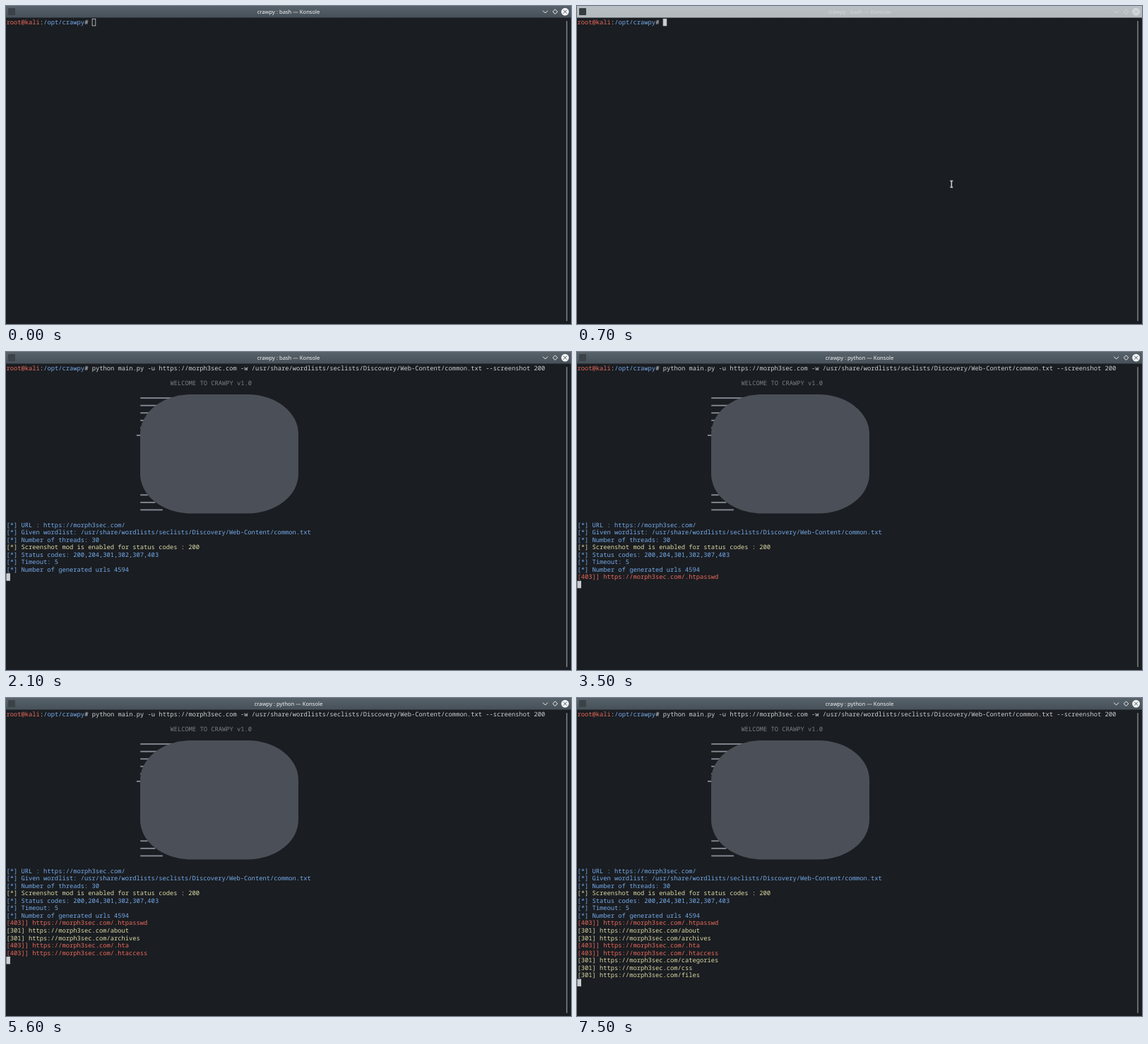
An HTML page that plays this animation: 800x450 px, repeating every 8 s.

```html
<!DOCTYPE html>
<html lang="en">
<head>
<meta charset="utf-8">
<title>Terminal</title>
<style>
html, body { margin: 0; width: 100%; height: 100%; overflow: hidden; background: #1a1d21; }
svg { display: block; width: 100vw; height: 100vh; }
text { white-space: pre; text-rendering: geometricPrecision; }
.mono { font: 8.783px "Noto Sans Mono", monospace; }
.title { font: 7.62px "Noto Sans", sans-serif; text-anchor: middle; }
</style>
</head>
<body>
<svg id="stage" viewBox="0 0 800 450">
  <defs>
    <linearGradient id="bar" x2="0" y2="1">
      <stop stop-color="#58626a"/><stop offset="1" stop-color="#465058"/>
    </linearGradient>
  </defs>
  <rect width="800" height="450" fill="#1a1d21"/>
  <rect width="800" height="16.5" fill="url(#bar)"/>
  <rect id="light" width="800" height="16.5" fill="#eceef0"/>
  <rect id="icon" x="3" y="3" width="10" height="10" rx=".8"/>
  <text id="title" class="title" x="400" y="10.9"></text>
  <g id="buttons" fill="none" stroke-width="1">
    <path d="M760.2 6.6l3.4 3.4 3.4-3.4M777.5 4.8l3.3 3.3-3.3 3.3-3.3-3.3z"/>
    <circle id="close" cx="791.6" cy="8.1" r="5.4" stroke="none"/>
    <path id="cross" d="M789.1 5.6l5 5m0-5l-5 5"/>
  </g>
  <rect x="793.2" y="21" width="1.7" height="425" rx=".8" fill="#74787b"/>
  <g id="screen" class="mono"></g>
  <rect id="cursor" width="4.7" height="9.6" stroke="#cccfd1" stroke-width=".8"/>
  <path id="pointer" d="M528.3 247.5h4M530.3 247.5v9M528.3 256.5h4" fill="none" stroke="#c9ccce" stroke-width="1.6"/>
</svg>
<script>
const LOOP = 8000, COL = 5.27, ROW = 10.55, LEFT = 0.5, BASE = 26;
const RED = '#ea6a5c', BLUE = '#76abec', YELLOW = '#dcdaa6', WHITE = '#cfd2d4', GREY = '#7c8087';
const SITE = 'https://morph3sec.com';
const $ = id => document.getElementById(id);
const screen = $('screen');
const timed = [];

function add(tag, attrs, parent = screen) {
  const el = document.createElementNS('http://www.w3.org/2000/svg', tag);
  for (const key in attrs) el.setAttribute(key, attrs[key]);
  return parent.appendChild(el);
}

function print(at, row, col, fill, str) {
  const el = add('text', { x: LEFT + col * COL, y: BASE + row * ROW, fill });
  el.textContent = str;
  timed.push({ at, el });
}

print(0, 0, 0, RED, 'root@kali');
print(0, 0, 9, WHITE, ':');
print(0, 0, 10, BLUE, '/opt/crawpy');
print(0, 0, 21, WHITE, '#');
print(1500, 0, 23, WHITE, `python main.py -u ${SITE} -w /usr/share/wordlists/seclists/Discovery/Web-Content/common.txt --screenshot 200`);
print(2100, 2, 44, GREY, 'WELCOME TO CRAWPY v1.0');

// Banner: ruled lines behind one plain rounded shape
const banner = add('g', {});
timed.push({ at: 2100, el: banner });
const rule = (row, col, n) => add('rect', {
  x: LEFT + col * COL, y: 22 + row * ROW, width: n * COL, height: 1.9, fill: '#858993'
}, banner);
[12, 8, 6, 4, 4, 0, 0, 0, 0, 2, 0, 0, 0, 2, 4, 6].forEach((n, i) => n && rule(4 + i, 36, n));
rule(9, 35, 2);
rule(4, 65, 3);
add('rect', { x: 190, y: 60, width: 224, height: 168.5, rx: 72, ry: 56, fill: '#4b4f57' }, banner);

[
  [BLUE, `URL : ${SITE}/`],
  [BLUE, 'Given wordlist: /usr/share/wordlists/seclists/Discovery/Web-Content/common.txt'],
  [BLUE, 'Number of threads: 30'],
  [YELLOW, 'Screenshot mod is enabled for status codes : 200'],
  [BLUE, 'Status codes: 200,204,301,302,307,403'],
  [BLUE, 'Timeout: 5'],
  [BLUE, 'Number of generated urls 4594']
].forEach(([fill, str], i) => print(2100, 21 + i, 0, fill, '[*] ' + str));

const hits = [
  [3500, 403, '.htpasswd'], [3900, 301, 'about'], [4700, 301, 'archives'],
  [5600, 403, '.hta'], [5600, 403, '.htaccess'], [5700, 301, 'categories'],
  [6300, 301, 'css'], [7200, 301, 'files']
];
hits.forEach(([at, code, path], i) => {
  const denied = code === 403;
  print(at, 28 + i, 0, denied ? RED : YELLOW, `[${code}]${denied ? ']' : ''} ${SITE}/${path}`);
});

const clamp = v => Math.min(1, Math.max(0, v));
const mix = (a, b, k) => `rgb(${a.map((v, i) => Math.round(v + (b[i] - v) * k))})`;
const show = (el, on) => el.setAttribute('visibility', on ? 'visible' : 'hidden');

function cursorCell(t) {
  if (t < 1500) return [0, 23];
  if (t < 1800) return [0, 145];
  if (t < 2100) return [1, 0];
  return [28 + hits.filter(h => t >= h[0]).length, 0];
}

function render(t) {
  // Title bar turns pale while the window is inactive
  const pale = t < 600 ? clamp((t - 50) / 250) : clamp((900 - t) / 300);
  const ink = mix([244, 246, 247], [196, 200, 203], pale);
  const face = mix([77, 87, 95], [236, 238, 240], pale);
  $('light').setAttribute('opacity', pale);
  $('icon').setAttribute('fill', mix([59, 66, 72], [52, 58, 62], pale));
  $('title').setAttribute('fill', ink);
  $('title').textContent = `crawpy : ${t < 2200 ? 'bash' : 'python'} — Konsole`;
  $('buttons').setAttribute('stroke', ink);
  $('close').setAttribute('fill', ink);
  $('cross').setAttribute('stroke', face);

  for (const { at, el } of timed) show(el, t >= at);
  show($('pointer'), t >= 400 && t < 1000);

  const [row, col] = cursorCell(t);
  const cursor = $('cursor');
  cursor.setAttribute('x', LEFT + col * COL + 0.4);
  cursor.setAttribute('y', 18.3 + row * ROW);
  cursor.setAttribute('fill', t < 500 ? 'none' : '#cccfd1');
}

const start = performance.now();
function tick() {
  render((performance.now() - start) % LOOP);
  requestAnimationFrame(tick);
}
tick();
</script>
</body>
</html>
```
